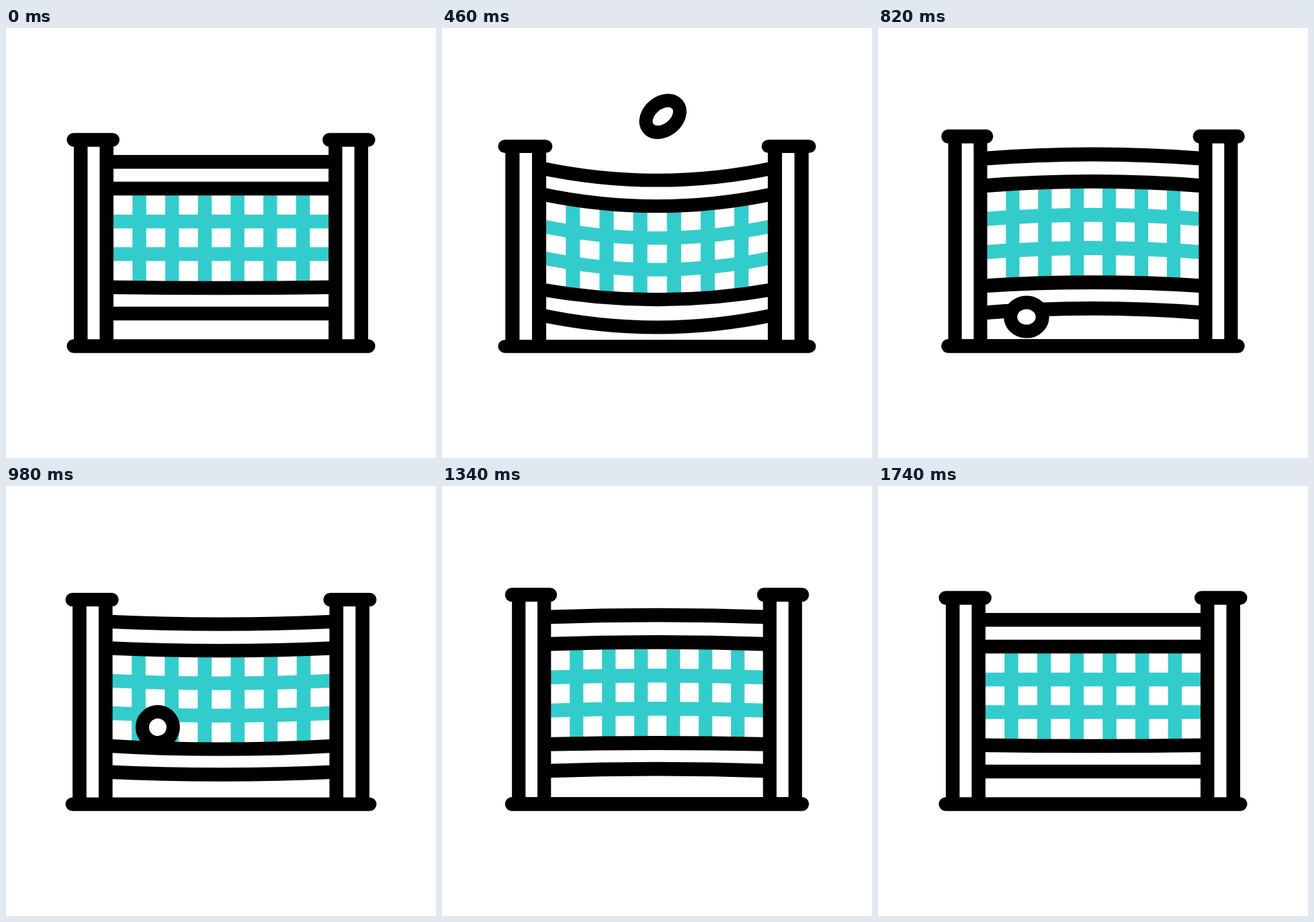
Recreate the animation shown at these times as an HTML page with a canvas. Size 640 by 640 pixels, loop 2.2 s.

```html
<!DOCTYPE html>
<html>
<head>
<meta charset="utf-8">
<style>
html, body { margin: 0; height: 100%; overflow: hidden; background: #fff; }
canvas { display: block; width: 100vmin; height: 100vmin; }
</style>
</head>
<body>
<canvas width="640" height="640"></canvas>
<script>
const ctx = document.querySelector('canvas').getContext('2d');
const LOOP = 2200, STEP = 20, GROUND = 484, STROKE = 20.5;
const TEAL = '#33cccc';

// Keys are [time, value] pairs
const SQUASH = [[200, 0], [435, .034], [460, .0304], [660, -.021], [730, -.023], [980, .0085],
  [1090, .022], [1200, .0085], [1420, -.021], [1520, -.0137], [1740, 0]];
const SAG = [[200, 0], [440, 20.5], [460, 19.3], [660, -8], [730, -9], [980, 4],
  [1090, 14], [1200, 5.5], [1420, -5], [1520, -2.6], [1740, 0]];
const TRAVEL = [[250, -1], [425, 0], [460, .14], [660, .905], [720, 1],
  [900, 1], [980, .88], [1105, 0], [1200, -.57], [1270, -1]];
const STRETCH = [[220, 0], [320, 4], [460, 5], [660, 3.5], [740, -3.5], [880, 0]];

// Monotone cubic interpolation, held at both ends
function track(keys, t) {
  const last = keys.length - 1;
  if (t <= keys[0][0]) return keys[0][1];
  if (t >= keys[last][0]) return keys[last][1];
  const slope = i => (keys[i + 1][1] - keys[i][1]) / (keys[i + 1][0] - keys[i][0]);
  const tangent = i => {
    if (i === 0 || i === last) return 0;
    const a = slope(i - 1), b = slope(i);
    return a * b <= 0 ? 0 : 2 * a * b / (a + b);
  };
  const i = keys.findIndex(k => k[0] > t) - 1;
  const [t0, v0] = keys[i], [t1, v1] = keys[i + 1];
  const h = t1 - t0, p = (t - t0) / h, q = 1 - p;
  return v0 * q * q * (1 + 2 * p) + v1 * p * p * (3 - 2 * p)
    + h * p * q * (tangent(i) * q - tangent(i + 1) * p);
}

function line(x1, y1, x2, y2, color = '#000', cap = 'butt') {
  ctx.strokeStyle = color;
  ctx.lineCap = cap;
  ctx.beginPath();
  ctx.moveTo(x1, y1);
  ctx.lineTo(x2, y2);
  ctx.stroke();
}

function ropePath(y, sag) {
  ctx.beginPath();
  ctx.moveTo(150, y);
  ctx.quadraticCurveTo(320, y + 2 * sag, 490, y);
}

function rope(y, sag, color = '#000') {
  ctx.strokeStyle = color;
  ctx.lineCap = 'butt';
  ropePath(y, sag);
  ctx.stroke();
}

function drawNet(t) {
  const squash = track(SQUASH, t), sag = track(SAG, t);
  ctx.save();
  ctx.translate(320, GROUND);
  ctx.scale(1 + squash, 1 - squash);
  ctx.translate(-320, -GROUND);
  ctx.lineWidth = STROKE;

  ctx.fillStyle = '#fff';
  ropePath(199, sag);
  ctx.lineTo(490, 473);
  ctx.lineTo(150, 473);
  ctx.fill();

  for (let i = 0; i < 6; i++) {
    const x = 198.5 + i * 48.7;
    const drop = sag * (1 - ((x - 320) / 170) ** 2);
    line(x, 239 + drop, x, 384 + drop, TEAL);
  }
  rope(288, sag, TEAL);
  rope(336.5, sag, TEAL);

  rope(199.3, sag);
  rope(239, sag);
  rope(385.7, Math.min(sag + 1.2, 16));
  rope(425, sag);

  for (const x of [111.2, 149.7, 490.3, 528.8]) line(x, 166.5, x, 473.5);
  for (const x of [100.7, 481.3]) line(x, 166.5, x + 58, 166.5, '#000', 'round');
  line(100.7, 473.5, 539.3, 473.5, '#000', 'round');
  ctx.restore();
}

// Point and heading on the arch: -1 behind the net, 0 top, 1 in front
function arch(travel, top) {
  const p = Math.abs(travel), q = 1 - p;
  const xs = travel < 0 ? [338, 366, 388, 388] : [338, 328, 223, 221];
  const ys = [top, top, travel < 0 ? 200 : 220, 430];
  const at = c => q * q * q * c[0] + 3 * q * q * p * c[1] + 3 * q * p * p * c[2] + p * p * p * c[3];
  const rate = c => q * q * (c[1] - c[0]) + 2 * q * p * (c[2] - c[1]) + p * p * (c[3] - c[2]);
  return { x: at(xs), y: at(ys), angle: Math.atan2(rate(ys), rate(xs)) };
}

function drawBall(t, travel) {
  const { x, y, angle } = arch(travel, t < 800 ? 126 : 118);
  const stretch = track(STRETCH, t);
  ctx.lineWidth = 20;
  ctx.strokeStyle = '#000';
  ctx.fillStyle = '#fff';
  ctx.beginPath();
  ctx.ellipse(x, y, 23 + stretch, 23 - stretch * .55, angle, 0, 2 * Math.PI);
  ctx.fill();
  ctx.stroke();
}

function draw(now) {
  const t = Math.floor(now % LOOP / STEP) * STEP;
  const travel = track(TRAVEL, t);
  ctx.fillStyle = '#fff';
  ctx.fillRect(0, 0, 640, 640);
  if (travel < 0) drawBall(t, travel);
  drawNet(t);
  if (travel >= 0) drawBall(t, travel);
  requestAnimationFrame(() => draw(performance.now()));
}
draw(performance.now());
</script>
</body>
</html>
```
